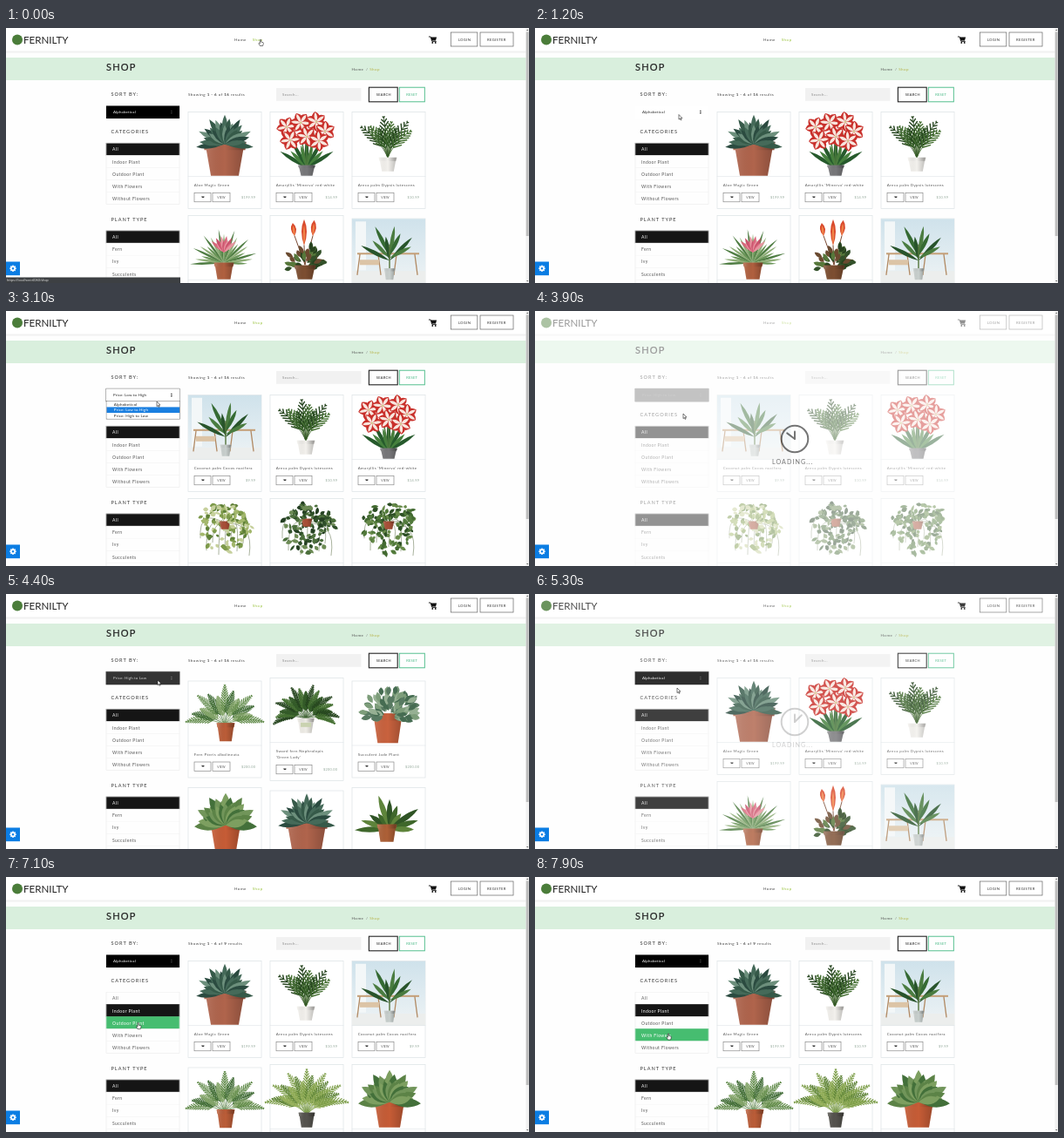
Animation of 600 by 293 pixels, one loop 8000 ms. Source, as an HTML page:

```html
<!DOCTYPE html>
<html lang="en">
<head>
<meta charset="utf-8">
<title>Plant shop</title>
<style>
html, body { margin: 0; width: 100%; height: 100%; overflow: hidden; background: #fefefe; }
svg { display: block; width: 100vw; height: 100vh; font-family: Lato, "Open Sans", sans-serif; }
</style>
</head>
<body>
<svg id="stage" viewBox="0 0 600 293"></svg>
<script>
const LOOP = 8000;
const rad = deg => deg * Math.PI / 180;
const fix = n => +n.toFixed(2);
const repeat = (n, fn) => Array.from({ length: n }, (_, i) => fn(i)).join('');

let seed = 7;
const rnd = (lo = 0, hi = 1) => {
  seed = (seed * 16807) % 2147483647;
  return lo + (hi - lo) * seed / 2147483647;
};

// Drawing helpers
const rect = (x, y, w, h, fill, more = '') =>
  `<rect x="${x}" y="${y}" width="${w}" height="${h}" fill="${fill}" ${more}/>`;
const box = (x, y, w, h, stroke, width = .7, fill = 'none') =>
  rect(x, y, w, h, fill, `stroke="${stroke}" stroke-width="${width}"`);
const text = (x, y, size, str, fill = '#555', gap = .4, more = '') =>
  `<text x="${x}" y="${y}" font-size="${size}" fill="${fill}" letter-spacing="${gap}" ${more}>${str}</text>`;
const path = (d, fill, more = '') => `<path d="${d}" fill="${fill}" ${more}/>`;
const line = (d, stroke, width) => path(d, 'none', `stroke="${stroke}" stroke-width="${width}" stroke-linecap="round"`);

const leaf = (x, y, angle, len, w, fill) =>
  path(`M0 0Q${fix(-w)} ${fix(-len * .55)} 0 ${fix(-len)}Q${fix(w)} ${fix(-len * .55)} 0 0`, fill,
    `transform="translate(${fix(x)} ${fix(y)}) rotate(${fix(angle)})"`);

function frond(x, y, angle, len, bend, leaflet, color, width = 1.2, n = 15) {
  let stem = `M${x} ${y}`, blades = '';
  for (let i = 1; i <= n; i++) {
    const h = rad(angle + bend * i / n);
    x += Math.sin(h) * len / n;
    y -= Math.cos(h) * len / n;
    stem += `L${fix(x)} ${fix(y)}`;
    if (i < n * .3) continue;
    const r = leaflet * Math.sin(Math.PI * (i / n * .85 + .1));
    for (const side of [-.7, .7])
      blades += `M${fix(x)} ${fix(y)}l${fix(Math.sin(h + side) * r)} ${fix(-Math.cos(h + side) * r)}`;
  }
  return line(stem, color, .8) + line(blades, color, width);
}

function pot(cx, y, w, h, fill = '#bb5d38') {
  const half = w / 2, shape = `M${cx - half * .93} ${y}h${w * .93}l${-w * .14} ${h}h${-w * .65}z`;
  const rim = `M${cx - half} ${y}h${w}l-1 ${h * .24}h${2 - w}z`;
  return path(shape, fill) + path(rim, fill) + path(shape, 'url(#shade)') + path(rim, 'url(#shade)');
}

const fan = (n, spread, fn) => repeat(n, i => fn(-spread + 2 * spread * i / (n - 1), i));
const pick = (list, i) => list[i % list.length];

function ivy(colors, potTop) {
  const trail = repeat(9, i => line(`M42 28Q${12 + i * 8} ${10 + i % 3 * 8} ${14 + i * 7} ${45 + i * 37 % 23}`, '#55663f', .5));
  const leaves = repeat(135, i => {
    const a = rnd(0, 6.28), r = Math.sqrt(rnd());
    const x = 43 + Math.cos(a) * r * 29, y = 26 + Math.sin(a) * r * (Math.sin(a) > 0 ? 36 : 21);
    return leaf(x, y, rnd(80, 280), rnd(4, 9), rnd(2.5, 5.5), pick(colors, i));
  });
  return trail + leaves + pot(42, potTop, 13, 9, '#a94f37') + clump(42, potTop + 1, colors, 10, 9, 5, 6);
}

const bloom = (x, y, r) => repeat(6, i => leaf(x, y, i * 60 + x, r, r * .72, '#c9302b')) +
  repeat(6, i => leaf(x, y, i * 60 + x, r * .92, r * .3, '#f8e6de')) + `<circle cx="${x}" cy="${y}" r="1.1" fill="#cfd48c"/>`;

const rosette = (x, y, greens, len, w, spread = 95) =>
  fan(19, spread, (a, i) => leaf(x, y, a, len * (1 - .12 * (i % 3)), w, pick(greens, i))) +
  fan(13, spread * .85, (a, i) => leaf(x, y + 1, a, len * .68, w * .85, pick(greens, i + 1)));

const clump = (x, y, greens, n, w, h, size) => repeat(n, i => {
  const a = rnd(-95, 95), d = rnd(.2, 1);
  return leaf(x + Math.sin(rad(a)) * w * d, y - Math.cos(rad(a)) * h * d, a + rnd(-25, 25), size * rnd(.8, 1.2), size * .48, pick(greens, i));
});

const palmGreens = ['#25441e', '#446f31', '#335a28'];
const plants = {
  aloe: () => pot(42, 34, 49, 39, '#b0644c') + rosette(42, 36, ['#2b4b40', '#456a59', '#365a49', '#6c8f7c'], 33, 7, 97),
  amaryllis: () => fan(9, 58, (a, i) => leaf(42, 64, a, 36 - i % 2 * 9, 4.5, pick(['#265a2c', '#45803d'], i))) +
    [35, 42, 50].map(x => line(`M42 64L${x} 25`, '#4c7a3d', 1.5)).join('') + pot(42, 61, 20, 12, '#77777a') +
    [[19, 17], [35, 12], [53, 11], [63, 22], [42, 28], [23, 32], [56, 33]].map(([x, y]) => bloom(x, y, 12)).join(''),
  areca: () => fan(7, 9, a => line(`M41 53L${41 + a} 28`, '#5b7d3b', .7)) +
    fan(8, 37, (a, i) => frond(41, 52, a * .6, 46 - i % 3 * 6, a * .9, 10, pick(palmGreens, i), 1.4, 9)) +
    pot(41, 52, 21, 16, '#f3f1ed'),
  bromeliad: () => fan(21, 92, (a, i) => leaf(41, 54, a, 39 - i % 3 * 6, 2.6, pick(['#4f7d43', '#8fae78', '#6b9659'], i))) +
    fan(11, 48, (a, i) => leaf(41, 42, a, 19 - i % 2 * 5, 3.6, pick(['#d9667c', '#e695a0', '#c9526c'], i))) + pot(41, 54, 23, 19, '#b0603f'),
  celosia: () => [[28, 23, -8, 15], [39, 34, 0, 30], [49, 23, 5, 18]].map(([x, y, a, l]) =>
      line(`M40 56L${x} ${y}`, '#7a4a35', 1) + leaf(x, y, a, l, 6, '#d9492c') + leaf(x, y, a, l * .8, 2.5, '#f08348')).join('') +
    clump(40, 58, ['#33512a', '#57783b', '#28421f', '#6a4a30'], 46, 16, 20, 10) + pot(40, 57, 25, 16, '#7d4e31'),
  coconut: () => rect(0, 0, 84, 74, 'url(#wall)') + rect(0, 60, 84, 14, '#eceeed') + rect(4, 3, 12, 56, '#f3f7f8') +
    rect(6, 39, 71, 2, '#c59f77') + repeat(4, i => line(`M${9 + i * 21} 41l${i % 2 ? 3 : -3} 23`, '#b18a64', 1.3)) +
    rect(9, 47, 22, 6, '#dcc4a6') + fan(8, 62, (a, i) => leaf(43, 48 - i % 3 * 3, a, 37 - i % 2 * 9, 4.6, pick(['#28542b', '#4a7c40', '#356a33'], i))) +
    line('M43 60V30', '#52733a', 1.4) + pot(43, 57, 13, 13, '#c9d0ce'),
  fern: () => fan(13, 84, (a, i) => frond(42, 50, a * .75, 45 - i % 3 * 6, a * .5, 6.5, pick(['#608a49', '#3c6831', '#83a468'], i), 1.2)) + pot(43, 48, 21, 21),
  sword: () => fan(17, 96, (a, i) => frond(41, 47, a * .65, 39 - i % 3 * 4, a * .7, 5, pick(palmGreens, i), 1.4)) +
    pot(41, 46, 20, 17, '#efede7') + rect(35, 51, 12, 5, '#c9d2b0'),
  jade: () => pot(41, 37, 36, 34, '#c9623e') + clump(42, 42, ['#587a62', '#7d9d7a', '#466c52', '#96b093'], 95, 28, 29, 12),
  succulent: () => pot(43, 41, 37, 31, '#c65c36') + rosette(43, 42, ['#5c8347', '#7d9f60', '#43703a', '#71955a'], 36, 11, 94),
  staghorn: () => fan(11, 92, (a, i) => leaf(43, 47, a, 40 - i % 4 * 6, 6.5, pick(['#3f672b', '#5e843b', '#2f5425'], i))) + pot(40, 42, 23, 20, '#ad6037'),
  parlour: () => fan(19, 84, (a, i) => frond(42, 57, a * .5, 51 - i % 3 * 7, a * .7, 7, pick(['#7c9d48', '#5e8338', '#98b25d'], i), 1.2)) + pot(42, 55, 19, 17, '#55534e'),
  ivyLight: () => ivy(['#7d9a4b', '#c6d09c', '#5f8038', '#a3b76c'], 26),
  ivyDark: () => ivy(['#2f5029', '#4c6f3c', '#243f22', '#6d8b55'], 23),
  ivyGreen: () => ivy(['#436a31', '#688b4a', '#2d4f25', '#527a3b'], 26)
};

// Product grids
const COLS = [209, 303, 397];
const CART = 'M0 0h.8l.5 2h2.3l.5-1.5h-2.9';
function card(col, y, plant, title = '', price = '') {
  const x = COLS[col], lines = title.split('|'), extra = (lines.length - 1) * 7;
  const b = y + 93 + extra;
  return box(x, y, 84, 111 + extra, '#dce3e5', .7, '#fff') + `<use href="#${plant}" x="${x}" y="${y + .3}"/>` +
    line(`M${x} ${y + 74}h84`, '#dfe5e7', .6) +
    lines.map((s, i) => text(x + 6.7, y + 85.7 + i * 7, 4.4, s, '#555', .4)).join('') +
    box(x + 7, b, 19, 10.3, '#777', .6) + path(CART, '#333', `transform="translate(${x + 14.5} ${b + 3.6})"`) +
    box(x + 28, b, 20, 10.3, '#777', .6) + text(x + 33.2, b + 6.5, 3.4, 'VIEW', '#555', .2) +
    text(x + 77.3, b + 6.6, 3.8, price, '#8fa596', .3, 'text-anchor="end"');
}
const aloe = ['aloe', 'Aloe Magic Green', '$199.99'];
const amaryllis = ['amaryllis', "Amaryllis 'Minerva' red-white", '$14.99'];
const areca = ['areca', 'Areca palm Dypsis lutescens', '$10.99'];
const coconut = ['coconut', 'Coconut palm Cocos nucifera', '$9.99'];
const grids = {
  alphabetical: [[96.5, ...aloe], [96.5, ...amaryllis], [96.5, ...areca], [215.5, 'bromeliad'], [215.5, 'celosia'], [219, 'coconut']],
  cheap: [[96.5, ...coconut], [96.5, ...areca], [96.5, ...amaryllis], [215.5, 'ivyLight'], [215.5, 'ivyDark'], [215.5, 'ivyGreen']],
  costly: [[100, 'fern', 'Fern Pteris albolineata', '$200.00'], [96.5, 'sword', "Sword fern Nephrolepis|'Green Lady'", '$200.00'],
    [100, 'jade', 'Succulent Jade Plant', '$200.00'], [222.5, 'succulent'], [226, 'aloe'], [222.5, 'staghorn']],
  indoor: [[96.5, ...aloe], [96.5, ...areca], [96.5, ...coconut], [219, 'fern'], [215.5, 'parlour'], [215.5, 'succulent']]
};

const SORTS = ['Alphabetical', 'Price: Low to High', 'Price: High to Low'];
const CATEGORIES = ['All', 'Indoor Plant', 'Outdoor Plant', 'With Flowers', 'Without Flowers'];
const ROW = 14.1;
const listRows = (top, names, key) => names.map((name, i) =>
  `<g id="${key}${i}">${box(115, fix(top + i * ROW), 84, ROW, '#f4f4f4', .5, '#fefefe')}${text(122, fix(top + 9.2 + i * ROW), 5, name, '#555', .42)}</g>`).join('') +
  box(115, top, 84, fix(names.length * ROW), '#eee', .5);
const heading = (y, str) => text(120.5, y, 5.6, str, '#333', 1);

const cartIcon = line('M485.3 10h1.8l1.7 5.4h4.6', '#111', .9) + path('M487.3 10.6h6.8l-1.1 3.8h-4.7z', '#111') +
  '<circle cx="489.3" cy="16.9" r=".9"/><circle cx="492.7" cy="16.9" r=".9"/>';
const gear = '<g transform="translate(8 276.3)">' + repeat(8, i => rect(-.8, -3.7, 1.6, 2, '#fff', `transform="rotate(${i * 45})"`)) +
  '<circle r="2" fill="none" stroke="#fff" stroke-width="1.4"/></g>';

const header = rect(0, 0, 600, 27, '#fff') + line('M0 27.2H597', '#e3e3e3', .8) + line('M0 28.2H597', '#f5f5f5', 1) +
  '<circle cx="13" cy="13.5" r="6" fill="#4b7d3a"/>' + text(20, 17.5, 11.6, 'FERNILTY', '#222', 0) +
  text(262, 15, 4.5, 'Home', '#444', .5) + text(282.7, 15, 4.5, 'Shop', '#9bc43f', .5) + cartIcon +
  box(510.3, 5, 30.5, 16, '#666') + text(518.7, 14.6, 4.2, 'LOGIN', '#333', .35) +
  box(544, 5, 38, 16, '#666') + text(552, 14.6, 4.2, 'REGISTER', '#333', .35);

const page = rect(0, 34, 597, 26, '#d9efdd') +
  text(115, 49.3, 11, 'SHOP', '#222', 1.2, 'stroke="#222" stroke-width=".2"') +
  text(396.5, 48.8, 4.5, 'Home', '#555', .5) + text(413, 48.8, 4.5, '/', '#777') + text(417.3, 48.8, 4.5, 'Shop', '#b6b248', .4) +
  heading(77.8, 'SORT BY:') + heading(121, 'CATEGORIES') + heading(221.6, 'PLANT TYPE') +
  text(209, 78, 4.5, 'Showing <tspan font-weight="700">1 - 6</tspan> of <tspan id="total" font-weight="700">16</tspan> results', '#444', .46) +
  rect(310, 69, 97.5, 14.7, '#f1f1f1') + text(317, 78, 4.4, 'Search...', '#888', .3) +
  box(416.4, 68.2, 32.8, 16.6, '#222', 1.1) + text(424.7, 78, 4, 'SEARCH', '#222', .3) +
  box(451.3, 68.2, 29, 16.6, '#43b883', .9) + text(459.3, 78, 4, 'RESET', '#43b883', .2) +
  listRows(132.2, CATEGORIES, 'cat') + listRows(233, ['All', 'Fern', 'Ivy', 'Succulents', 'Other'], 'type');

const select = `<g id="select">${rect(114.3, 88.8, 85.4, 15.8, '#8a8a8a', 'id="ring" rx=".8"')}
  ${rect(114.9, 89.4, 84.2, 14.6, '#000', 'id="field"')}${text(123, 98.2, 4.4, '', '#fff', .17, 'id="value"')}
  ${path('M188.8 96.1l1.1-1.6 1.1 1.6zM188.8 97.1l1.1 1.6 1.1-1.6z', '#fff', 'id="arrows"')}</g>`;
const dropdown = `<g id="dropdown">${box(115.2, 103.5, 84.3, 20.6, '#777', .7, '#fff')}${SORTS.map((s, i) =>
  `<g id="sort${i}">${rect(115.6, fix(103.8 + i * 6.6), 83.5, 6.6, '#fff')}${text(123.8, fix(108.5 + i * 6.6), 4.5, s, '#222', .18)}</g>`).join('')}</g>`;

const loader = `<g id="loader">${rect(0, 0, 597, 293, '#fff', 'opacity=".8"')}
  <circle cx="298" cy="147" r="15.3" fill="none" stroke="#333" stroke-width="2"/>
  <g transform="translate(298 147)">${line('M0 0V-8.5', '#333', 2)}<g id="hand">${line('M0 0V-11', '#333', 2)}</g></g>
  ${text(272, 176, 7.2, 'LOADING...', '#333', 1)}</g>`;

const chrome = rect(596.4, 0, 3.6, 293, '#f1f1f1') + rect(596.7, 4.5, 3, 234.5, '#bdbdbd') +
  path('M597 3l1.2-1.6 1.2 1.6zM597 290l1.2 1.6 1.2-1.6z', '#666') + rect(0, 268.5, 16, 15.7, '#0b7de3') + gear +
  `<g id="status">${rect(0, 286.5, 200, 6.5, '#3d4043')}${text(1, 291.3, 3.8, 'https://localhost:6060/shop', '#ddd', .05)}</g>`;

const outline = 'stroke="#111" stroke-width=".55" stroke-linejoin="round"';
const cursor = `<g id="cursor">${path('M0 0V5.6L1.3 4.4 2.2 6.4 3.1 6 2.2 4.1H4z', '#fff', outline + ' id="arrow"')}
  ${path('M-.6 .5Q0-.3 .6 .5V3L3 3.6Q3.6 4 3.2 5.5L2.6 7.5H-.6L-2.2 4.6Q-2 3.6-.6 4.8z', '#fff', outline + ' id="pointer"')}</g>`;

const stage = document.getElementById('stage');
stage.innerHTML = `<defs>
  <linearGradient id="shade"><stop stop-color="#fff" stop-opacity=".12"/><stop offset=".5" stop-opacity="0"/><stop offset="1" stop-opacity=".22"/></linearGradient>
  <linearGradient id="wall" x2="0" y2="1"><stop stop-color="#cfe2eb"/><stop offset="1" stop-color="#eef3f5"/></linearGradient>
  ${Object.entries(plants).map(([id, draw]) => `<g id="${id}">${draw()}</g>`).join('')}</defs>` +
  rect(0, 0, 600, 293, '#fefefe') + header + page +
  Object.entries(grids).map(([id, cards]) => `<g id="grid-${id}">${cards.map((c, i) => card(i % 3, ...c)).join('')}</g>`).join('') +
  select + loader + chrome + dropdown + cursor;

// Timeline
const gridSteps = [[0, 'alphabetical'], [2500, 'cheap'], [4000, 'costly'], [5050, 'alphabetical'], [6150, 'indoor']];
const sortSteps = [[0, 0], [2300, 1], [3800, 2], [4850, 0]];
const rowSteps = [[0, 0], [1650, 1], [3400, 2], [4680, 0]];
const openSpans = [[1300, 2300], [3000, 3800], [4600, 4850]];
const loadSpans = [[2300, 2800], [3800, 4250], [4870, 5350], [5970, 6450]];
const lightKeys = [[0, 0], [850, 0], [1100, 1], [2300, 1], [2500, 0], [2820, 0], [3000, 1], [3800, 1], [4000, 0], [4320, 0], [4600, 1], [4850, 1], [5050, 0]];
const cursorKeys = [[0, 292, 13], [350, 292, 13], [950, 165, 99.5], [1350, 165, 99.5], [1850, 161, 111], [2500, 161, 111],
  [2950, 173, 104], [3130, 173, 104], [3580, 170, 118], [4050, 170, 118], [4350, 174, 99], [4600, 174, 99], [4750, 170, 106],
  [4900, 170, 106], [5250, 163, 108], [5420, 163, 108], [5800, 149.5, 148], [6700, 149.5, 148], [7400, 153, 179.5]];

const stepAt = (steps, t) => steps.findLast(s => s[0] <= t)[1];
const within = (spans, t) => spans.find(([a, b]) => t >= a && t < b);
function tween(keys, t, col) {
  const i = keys.findLastIndex(k => k[0] <= t), a = keys[i], b = keys[i + 1];
  if (!b) return a[col];
  const p = (t - a[0]) / (b[0] - a[0]);
  return a[col] + (b[col] - a[col]) * p * p * (3 - 2 * p);
}

const $ = id => document.getElementById(id);
const show = (id, on) => $(id).setAttribute('display', on ? 'inline' : 'none');
const paint = (id, bg, fg, edge = bg) => {
  const [back, label] = $(id).children;
  back.setAttribute('fill', bg);
  back.setAttribute('stroke', edge);
  label.setAttribute('fill', fg);
};
const grey = v => `rgb(${v},${v},${v})`;

function render(t) {
  const grid = stepAt(gridSteps, t), sort = stepAt(sortSteps, t), row = stepAt(rowSteps, t);
  for (const id in grids) show('grid-' + id, id === grid);
  $('total').textContent = grid === 'indoor' ? '9' : '16';

  const light = tween(lightKeys, t, 1), ink = grey(Math.round(255 - 220 * light));
  $('field').setAttribute('fill', grey(Math.round(255 * light)));
  $('value').setAttribute('fill', ink);
  $('value').textContent = SORTS[sort];
  $('arrows').setAttribute('fill', ink);
  $('arrows').setAttribute('opacity', .25 + .75 * light);
  show('ring', t >= 1300 && t < 5950);
  show('dropdown', within(openSpans, t));
  SORTS.forEach((_, i) => paint('sort' + i, i === row ? '#1a7fe0' : '#fff', i === row ? '#fff' : '#222', 'none'));

  const x = tween(cursorKeys, t, 1), y = tween(cursorKeys, t, 2);
  const chosen = t < 5950 ? 0 : 1, hovered = t > 5400 ? Math.floor((y - 132) / ROW) : -1;
  CATEGORIES.forEach((_, i) => i === chosen ? paint('cat' + i, '#151515', '#fff')
    : i === hovered ? paint('cat' + i, '#46bd70', '#fff') : paint('cat' + i, '#fefefe', '#555', '#f4f4f4'));

  const pointing = t < 420 || t >= 5600;
  $('cursor').setAttribute('transform', `translate(${fix(x)} ${fix(y)})`);
  show('pointer', pointing);
  show('arrow', !pointing);
  show('status', t < 700);

  const load = within(loadSpans, t);
  $('loader').setAttribute('opacity', load ? Math.min(1, (t - load[0]) / 150, (load[1] - t) / 220) : 0);
  $('hand').setAttribute('transform', `rotate(${fix((t - 5300) / 1100 * 360 + 45)})`);
}

paint('type0', '#151515', '#fff');
function tick() {
  render(performance.now() % LOOP);
  requestAnimationFrame(tick);
}
tick();
</script>
</body>
</html>
```
